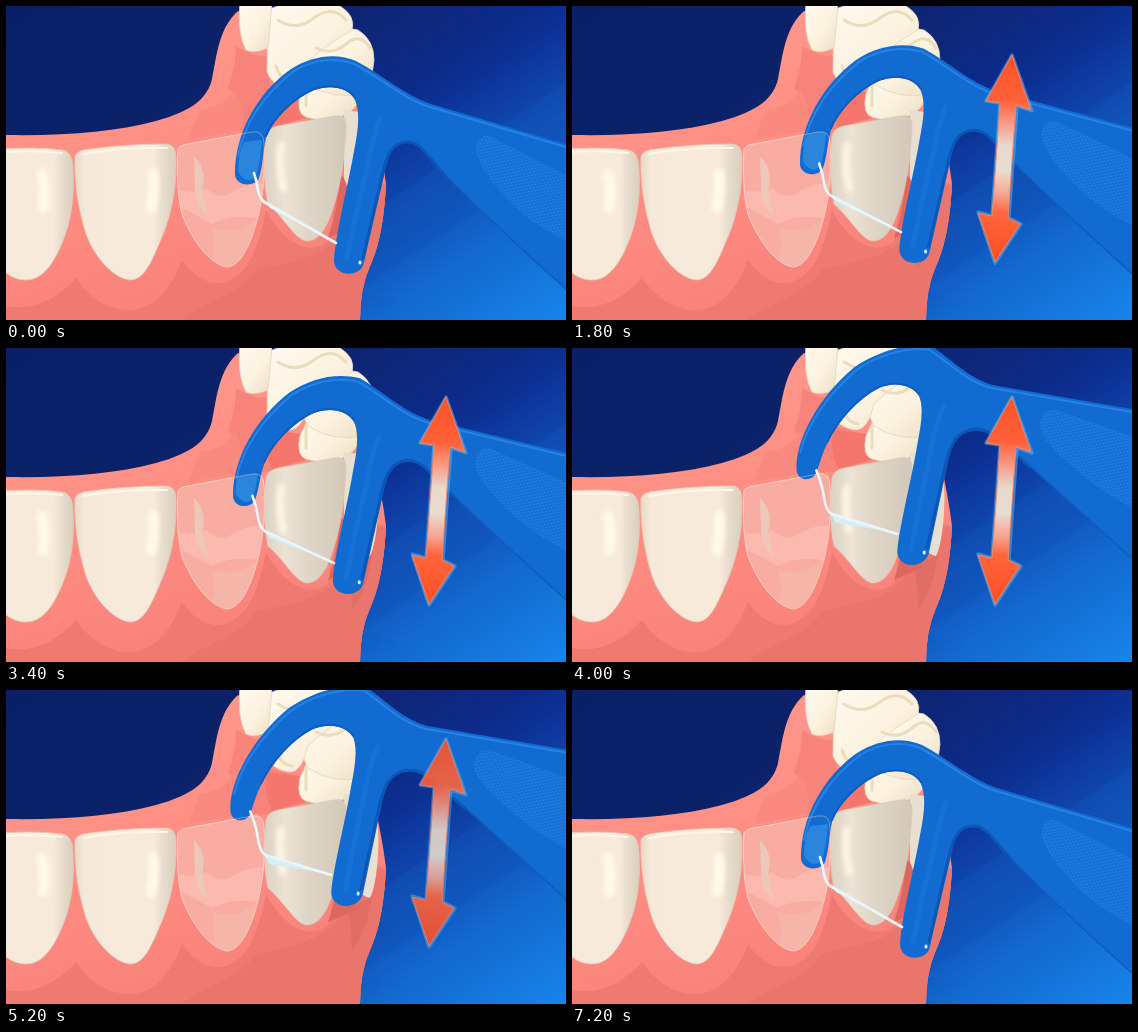
An HTML page that plays this animation: 560 px wide and 314 px high, repeating every 7400 ms.

```html
<!DOCTYPE html>
<html lang="en">
<head>
<meta charset="utf-8">
<title>Flossing between teeth</title>
<style>
  html, body { margin: 0; width: 100%; height: 100%; overflow: hidden; background: #0b2268; }
  svg { display: block; width: 100vw; height: 100vh; }
  .line { fill: none; stroke-linecap: round; stroke-linejoin: round; }
</style>
</head>
<body>
<svg viewBox="0 0 560 314" preserveAspectRatio="none">
  <defs>
    <linearGradient id="sky" gradientUnits="userSpaceOnUse" x1="0" y1="0" x2="312" y2="471">
      <stop offset="0" stop-color="#0a2066"/>
      <stop offset=".3" stop-color="#0b2268"/>
      <stop offset=".36" stop-color="#0d2573"/>
      <stop offset=".5" stop-color="#0c2a86"/>
      <stop offset=".56" stop-color="#0c3093"/>
      <stop offset=".63" stop-color="#0e3fa5"/>
      <stop offset=".7" stop-color="#0f4eb3"/>
      <stop offset=".76" stop-color="#1058bf"/>
      <stop offset=".83" stop-color="#126acf"/>
      <stop offset=".92" stop-color="#1577dc"/>
      <stop offset="1" stop-color="#1783e9"/>
    </linearGradient>
    <linearGradient id="gum" gradientUnits="userSpaceOnUse" x1="120" y1="60" x2="190" y2="310">
      <stop offset="0" stop-color="#ff958a"/>
      <stop offset=".45" stop-color="#ff8c81"/>
      <stop offset="1" stop-color="#f6827a"/>
    </linearGradient>
    <linearGradient id="enamel">
      <stop offset="0" stop-color="#e6d9c8"/>
      <stop offset=".1" stop-color="#f7e9d9"/>
      <stop offset=".78" stop-color="#f8eada"/>
      <stop offset=".86" stop-color="#e9ddcd"/>
      <stop offset="1" stop-color="#dacebd"/>
    </linearGradient>
    <linearGradient id="side">
      <stop offset="0" stop-color="#dcd2c4"/>
      <stop offset=".25" stop-color="#ece3d5"/>
      <stop offset=".5" stop-color="#e0d7c8"/>
      <stop offset="1" stop-color="#d3c8b8"/>
    </linearGradient>
    <linearGradient id="molar" x1="0" y1="0" x2="1" y2="1">
      <stop offset="0" stop-color="#fffaf0"/>
      <stop offset=".55" stop-color="#fcf2df"/>
      <stop offset="1" stop-color="#ecddc3"/>
    </linearGradient>
    <linearGradient id="heat" gradientUnits="userSpaceOnUse" x1="439" y1="48" x2="423" y2="257">
      <stop offset="0" stop-color="#ff5126"/>
      <stop offset=".22" stop-color="#ff6138"/>
      <stop offset=".34" stop-color="#f7a08d"/>
      <stop offset=".44" stop-color="#e8d9cc"/>
      <stop offset=".56" stop-color="#e8ddd0"/>
      <stop offset=".67" stop-color="#f6a593"/>
      <stop offset=".76" stop-color="#ff653c"/>
      <stop offset="1" stop-color="#ff4d22"/>
    </linearGradient>
    <pattern id="grain" width="5" height="4" patternUnits="userSpaceOnUse" patternTransform="rotate(28)">
      <rect width="5" height="4" fill="#166fd6"/>
      <path d="M.5 1h1.4M3 2.8h1.4" stroke="#3090ee" stroke-width="1"/>
    </pattern>
    <filter id="soft"><feGaussianBlur stdDeviation="2"/></filter>
    <path id="clear" d="M172 143Q174 139 182 138L246 126Q258 124 258 138C259 160 258 185 253 207C246 235 236 260 221 261C202 258 184 230 176 208C171 188 171 165 172 143Z"/>
    <clipPath id="inClear"><use href="#clear"/></clipPath>
  </defs>

  <rect width="560" height="314" fill="url(#sky)"/>
  <g fill="#2a8cf0" opacity=".06">
    <path d="M350 216L560 76V112L350 250Z"/>
    <path d="M350 285L560 146V190L400 296Z"/>
  </g>

  <!-- gums -->
  <path fill="url(#gum)" d="M0 129C60 130 108 126 150 115C186 105 201 93 206 73C211 48 213 22 232 5L262 20L300 60L345 90L368 112Q376 146 380 178C378 212 374 238 364 260Q354 282 354 314H0Z"/>
  <path fill="#f8837a" d="M230 40Q250 52 262 50L264 78L296 88V112L262 124L224 124Q238 100 222 82Q230 62 230 40Z"/>
  <path fill="#fa897f" d="M194 104Q222 100 228 82Q240 104 236 124L182 134Z"/>
  <path fill="#f4766d" d="M262 82L294 86L300 112L266 121Q256 98 262 82Z"/>

  <!-- back teeth -->
  <g fill="url(#molar)" stroke="#e6d6ba" stroke-width=".8">
    <path d="M306 62Q330 50 352 66Q360 92 346 104Q326 120 300 111Q290 108 294 88Z"/>
    <path d="M304 30Q330 18 352 24Q368 34 368 54Q366 78 356 88Q326 94 302 78Q288 54 304 30Z"/>
    <path d="M262 4Q290 -10 334 0Q350 10 346 24Q318 40 302 56Q296 82 284 82Q266 80 261 66Z"/>
    <path d="M234 -4H266Q264 24 262 42Q248 48 240 44Q231 28 234 -4Z"/>
  </g>
  <path class="line" stroke="#ecdcbe" stroke-width="3" d="M272 14Q290 26 308 12T340 14M310 42Q326 50 340 38T364 42M270 60Q274 74 286 76M300 78V100"/>

  <!-- gum relief in front -->
  <path fill="#ee7a71" d="M0 300C30 306 54 290 70 272C84 292 104 306 128 304C152 300 166 280 176 254C186 268 204 284 224 274C244 266 254 236 260 204C274 232 300 252 322 236L334 170L380 178C378 212 374 238 364 260Q354 282 354 314H0Z"/>
  <path fill="#ea756c" d="M175 314C205 292 232 290 250 264C280 256 318 252 332 230L340 176L380 180C378 212 374 238 364 260Q354 282 354 314Z"/>
  <path fill="#dd675f" d="M334 170L350 178L350 220L322 232Q332 205 334 170Z"/>
  <path fill="#dc6a61" opacity=".6" d="M340 212Q352 216 366 206Q362 240 346 262Q346 236 340 212Z"/>
  <path fill="#e9dfd0" d="M338 104L368 108Q374 135 372 165Q370 196 364 208Q350 206 338 172Z"/>

  <!-- front teeth -->
  <g stroke="#dccbb8" stroke-width=".8" fill="url(#enamel)">
    <path d="M-22 144Q28 140 56 144Q67 145 67 164C69 195 64 220 54 242C43 266 32 274 20 274C0 274 -14 255 -22 235Z"/>
    <path d="M69 150Q71 144 84 143Q120 138 160 138Q170 138 170 152C171 185 164 214 153 238C143 262 136 274 124 274C106 272 88 250 80 228C72 202 68 176 69 150Z"/>
    <path fill="url(#side)" d="M260 130Q262 122 272 120L328 110Q341 107 340 122C338 160 333 186 325 208C318 228 310 235 300 235C288 232 280 214 262 198C257 175 258 150 260 130Z"/>
  </g>
  <g class="line" stroke="#fff9e8" filter="url(#soft)">
    <path stroke-width="11" d="M36 168Q40 184 37 202M147 168Q149 184 145 202"/>
    <path stroke-width="8" opacity=".8" d="M275 140Q272 158 277 182"/>
  </g>
  <path class="line" stroke="#fdf5e6" stroke-width="2" d="M0 146Q30 144 56 147M77 148Q115 141 161 142"/>

  <!-- see-through tooth -->
  <use href="#clear" fill="#f9aca1" stroke="#fac3b9" stroke-width="1"/>
  <g clip-path="url(#inClear)">
    <path fill="#fcb9af" d="M172 184Q190 188 200 182Q214 196 230 184Q246 176 260 178V214Q230 206 206 218Q188 208 172 200Z"/>
    <path fill="#f5b5a9" d="M206 222Q232 232 258 206V264H200Q214 246 206 222Z"/>
    <path fill="#ecc8b9" d="M188 150Q202 164 196 184Q198 198 202 210Q190 200 189 184Z"/>
  </g>

  <!-- floss pick -->
  <path id="body" fill="#116bd0"/>
  <path id="pad" fill="url(#grain)"/>
  <path id="crease" class="line" stroke="#0e5dbf" stroke-width="1.5"/>
  <path id="under" class="line" stroke="#0c56b6" stroke-width="3"/>
  <path id="inner" class="line" stroke="#0d5cbe" stroke-width="2"/>
  <path id="shine" class="line" stroke="#2583e6" stroke-width="2"/>
  <path id="stem" class="line" stroke="#1a77de" stroke-width="5" opacity=".6"/>
  <g clip-path="url(#inClear)">
    <path id="tip" fill="#5cb6f0" opacity=".35"/>
  </g>
  <use href="#clear" fill="none" stroke="#fbd6cd" stroke-width="1" opacity=".4"/>
  <path id="film" fill="#d6eef6"/>
  <path id="floss" class="line" stroke="#e9f6fc" stroke-width="2.6"/>
  <path id="dot" class="line" stroke="#d8eeff" stroke-width="3"/>

  <g id="arrow" stroke-linejoin="round">
    <path fill="none" stroke="#6fb2e6" stroke-width="3.4" opacity=".5" d="M440 49L460 105L445 100L437 212L449 218L423 257L406 206L420 210L428 97L414 95Z"/>
    <path fill="url(#heat)" stroke="#e98a70" stroke-width="1" d="M440 49L459 104L444 99L436 212L448 218L423 256L406 207L420 210L428 97L414 95Z"/>
  </g>
</svg>
<script>
  const LOOP = 7400, STEP = 200;
  const $ = id => document.getElementById(id);

  // Each part: path in the lowest pose, path in the highest pose.
  const parts = {
    body: [
      'M229 168C229 128 250 88 285 63C305 50 330 46 350 55C375 68 400 90 425 98L570 141L570 292C520 248 470 200 440 170C420 147 414 134 400 135C386 136 383 148 378 170L358 256C356 272 328 272 328 254C330 225 342 180 348 145C352 125 355 105 348 92C342 82 325 78 308 84C285 94 266 115 260 132C257 145 257 160 253 172C248 182 229 180 229 168Z',
      'M224 116C223 88 247 44 282 15C304 0 332 -10 360 -8C380 6 396 24 420 31L570 55L570 213C530 175 490 140 460 113C430 88 420 74 402 75C384 77 380 90 375 112L357 199C354 216 325 217 325 198C328 170 339 128 345 92C349 72 352 52 346 42C339 32 322 29 306 36C285 47 265 70 255 92C249 102 247 112 243 121C238 130 224 128 224 116Z'],
    pad: [
      'M470 142Q472 128 484 130L570 174L570 240Q530 222 504 196Q468 158 470 142Z',
      'M468 68Q470 54 484 55L570 84L570 158Q530 138 504 114Q466 84 468 68Z'],
    crease: ['M440 170C470 200 520 248 570 292', 'M460 113C490 140 530 175 570 213'],
    under: [
      'M357 252L376 170C381 148 386 137 400 136C414 135 420 148 440 171',
      'M355 195L373 112C379 90 384 78 402 76C420 75 430 89 460 114'],
    inner: [
      'M260 130C266 114 285 93 308 83C325 77 342 81 349 92',
      'M255 90C265 69 285 46 306 35C322 28 339 31 347 42'],
    shine: [
      'M232 150C238 118 258 88 288 65C308 53 330 51 348 58C372 70 398 93 424 101L570 144',
      'M228 100C234 74 254 44 284 18C306 2 334 -6 358 -4C378 9 394 28 419 34L570 58'],
    stem: [
      'M341 252Q350 205 362 158Q368 128 374 112',
      'M339 196Q348 148 358 100Q364 66 372 52'],
    tip: [
      'M232 166Q232 148 238 136L256 134Q254 158 250 170Q242 180 232 166Z',
      'M226 114Q226 98 232 86L248 84Q246 108 242 118Q236 128 226 114Z'],
    film: ['M258 194L330 236L264 202Z', 'M257 161L325 180L264 172Z'],
    floss: [
      'M248 167Q251 176 252 184Q253 191 258 196L330 237',
      'M244 118Q250 132 252 146Q254 160 260 163L325 181'],
    dot: ['M354 256L354 257', 'M352 199L352 200']
  };

  const mix = (a, b, p) => {
    const num = /-?\d+/g, ends = b.match(num);
    let i = 0;
    return a.replace(num, n => (+n + (ends[i++] - n) * p).toFixed(2) + ' ');
  };

  // Keys are [time, value], eased between neighbours.
  const at = (keys, t) => {
    const n = keys.findIndex(k => k[0] > t);
    if (n < 0) return keys[keys.length - 1][1];
    if (!n) return keys[0][1];
    const [t0, v0] = keys[n - 1], [t1, v1] = keys[n];
    return v0 + (v1 - v0) * (1 - Math.cos(Math.PI * (t - t0) / (t1 - t0))) / 2;
  };

  const lift = [[0, 0], [1000, 1], [1720, .17], [2440, 1], [3150, .16], [3860, 1],
    [4520, .16], [5220, .93], [5920, .14], [6500, .45], [7200, 0]];
  const show = [[300, 0], [800, 1], [5050, 1], [5750, 0]];

  function draw(now) {
    const t = Math.floor(now % LOOP / STEP) * STEP;
    const p = at(lift, t);
    for (const id in parts) $(id).setAttribute('d', mix(...parts[id], p));
    $('arrow').setAttribute('opacity', at(show, t));
    requestAnimationFrame(draw);
  }
  draw(0);
</script>
</body>
</html>
```
